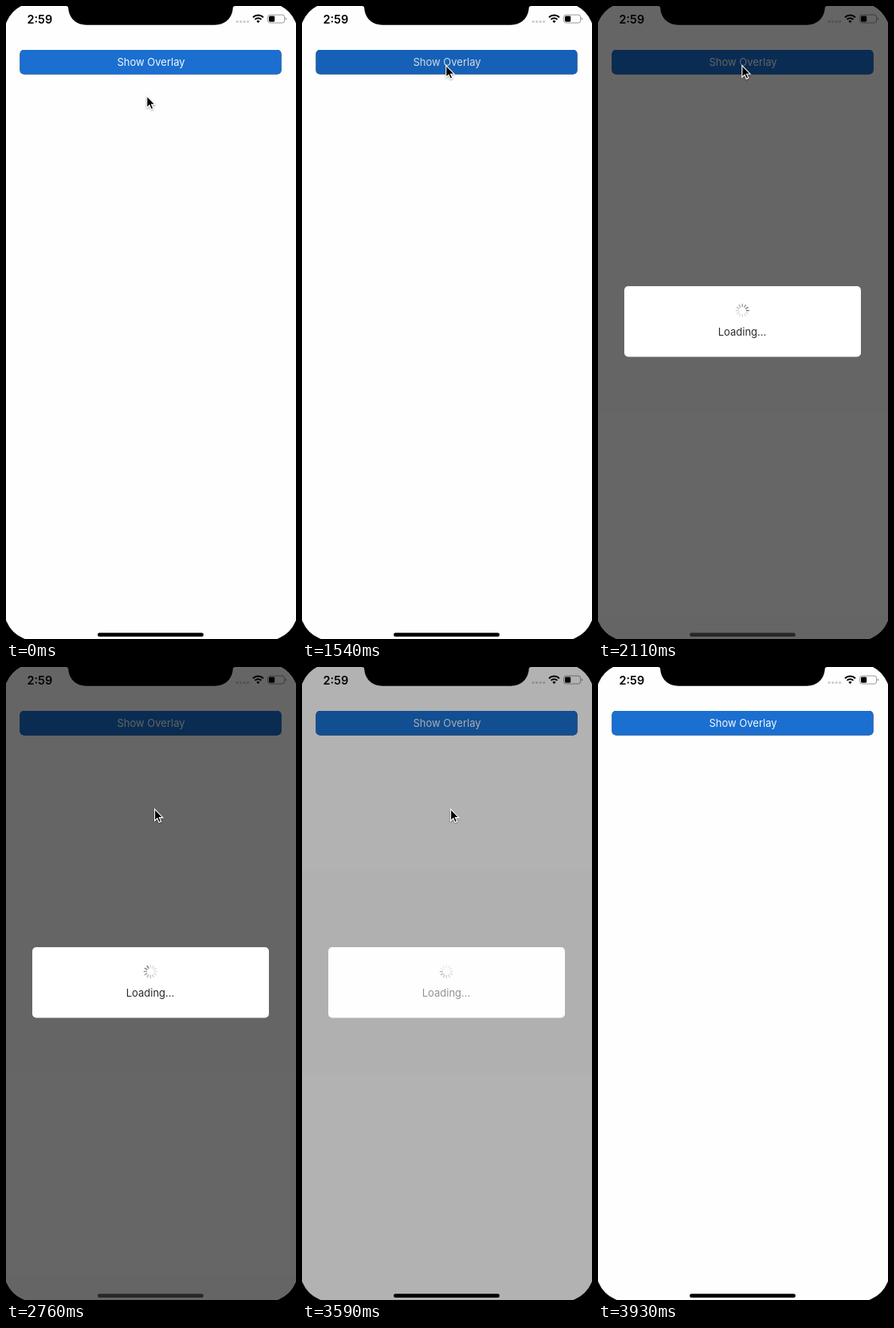
Write an HTML page that moves like this. It is 364 px wide and 793 px high and loops after 4.71 s.

```html
<!DOCTYPE html>
<html lang="en">
<head>
<meta charset="utf-8">
<title>Loading overlay</title>
<style>
  html, body { margin: 0; width: 100%; height: 100%; overflow: hidden; background: #000; }
  svg { display: block; width: 364px; height: 793px; }
  text { font-family: Inter, "Liberation Sans", sans-serif; font-size: 13px; text-anchor: middle; }
</style>
</head>
<body>
<svg viewBox="0 0 364 793" xmlns="http://www.w3.org/2000/svg">
  <defs>
    <clipPath id="screen"><rect x="-2" y="-4" width="368" height="799" rx="38"/></clipPath>
    <filter id="shadow" x="-50%" y="-50%" width="200%" height="200%">
      <feDropShadow dx="0" dy="1" stdDeviation="0.8" flood-opacity="0.4"/>
    </filter>
  </defs>
  <rect width="364" height="793"/>
  <g clip-path="url(#screen)">
    <rect width="364" height="793" fill="#fefefe"/>
    <rect x="17.5" y="55" width="328" height="30.5" rx="5"/>
    <g id="button">
      <rect x="17.5" y="55" width="328" height="30.5" rx="5" fill="#1a6fd1"/>
      <text x="182" y="75" fill="#f4f8fd">Show Overlay</text>
    </g>
    <g id="overlay">
      <rect width="364" height="793" fill-opacity="0.6"/>
      <rect x="33" y="351" width="297" height="88.5" rx="5" fill="#fff"/>
      <g id="spinner" transform="translate(181.3 381.5)" stroke="#6e6e6e" stroke-width="1.5" stroke-linecap="round"/>
      <text x="181" y="413" fill="#2a2a2a">Loading...</text>
    </g>
    <text x="42.3" y="21.6" style="font-size:14.5px;font-weight:600">2:59</text>
    <g fill-opacity="0.2">
      <circle cx="290.2" cy="19.6" r="1.6"/><circle cx="294.7" cy="19.6" r="1.6"/>
      <circle cx="299.2" cy="19.6" r="1.6"/><circle cx="303.7" cy="19.6" r="1.6"/>
    </g>
    <g fill="none" stroke="#000" stroke-width="2">
      <path d="M310 14.2a9.2 9.2 0 0 1 13 0"/>
      <path d="M312.5 16.9a5.7 5.7 0 0 1 8 0"/>
    </g>
    <path d="M316.5 21.2l-2.1-2.2a3 3 0 0 1 4.2 0z"/>
    <rect x="328.6" y="11.1" width="21" height="10" rx="2.8" fill="none" stroke="#000" stroke-opacity="0.4"/>
    <path d="M350.8 14.4q1.5 0.4 1.5 1.7t-1.5 1.7z" fill-opacity="0.4"/>
    <rect x="330" y="12.5" width="7.2" height="7.2" rx="1.4"/>
    <path d="M75 0Q78.3 0 78.3 3C79 15 88 23.7 101 23.7H262C275 23.7 284 15 284.7 3Q284.7 0 288 0Z"/>
    <rect id="home" x="115" y="785.3" width="133" height="4.7" rx="2.35"/>
  </g>
  <g id="cursor" filter="url(#shadow)">
    <path d="M0 0V14.6L3.3 11.5L5.5 16.6L8 15.5L5.8 10.6H10.3Z" stroke="#fff" stroke-width="1.1"/>
  </g>
</svg>
<script>
const LOOP = 4710, SPOKES = 12, TICK = 1000 / SPOKES;
const $ = id => document.getElementById(id);
const clamp = x => Math.min(1, Math.max(0, x));
const span = (t, a, b) => clamp((t - a) / (b - a));
const easeOut = x => 1 - (1 - x) ** 2;
const easeIn = x => x * x;
const easeInOut = x => x * x * (3 - 2 * x);

// cursor moves: start, end, x, y, easing
const start = [176.8, 112.8];
const moves = [
  [20, 350, 180.4, 86.4, easeInOut],
  [900, 1180, 180.8, 74.6, easeInOut],
  [2150, 2580, 186.6, 178, easeInOut],
  [3660, 3930, 366, -22, easeIn]
];

const spokes = Array.from({ length: SPOKES }, (_, i) => {
  const line = document.createElementNS("http://www.w3.org/2000/svg", "line");
  line.setAttribute("y1", -5);
  line.setAttribute("y2", -8);
  line.setAttribute("transform", `rotate(${i * 360 / SPOKES})`);
  $("spinner").append(line);
  return line;
});

function cursorAt(t) {
  let [x, y] = start;
  for (const [a, b, toX, toY, ease] of moves) {
    const k = ease(span(t, a, b));
    x += (toX - x) * k;
    y += (toY - y) * k;
  }
  return [x, y];
}

function draw(t) {
  const shown = easeOut(span(t, 1552, 1852)) - easeOut(span(t, 3504, 3804));
  $("overlay").setAttribute("opacity", shown);
  $("button").setAttribute("opacity", t >= 1535 && t < 1640 ? 0.88 : 1);

  const grey = Math.round(40 * clamp((shown - 0.6) / 0.4));
  $("home").setAttribute("fill", `rgb(${grey},${grey},${grey})`);

  const head = Math.floor((t - 2110) / TICK + 3.5);
  spokes.forEach((line, i) => {
    const age = (((head - i) % SPOKES) + SPOKES) % SPOKES;
    line.setAttribute("opacity", Math.max(0.22, 0.9 - age * 0.1));
  });

  $("cursor").setAttribute("transform", `translate(${cursorAt(t)})`);
  $("cursor").setAttribute("visibility", t < 3930 ? "visible" : "hidden");
}

function frame() {
  draw(performance.now() % LOOP);
  requestAnimationFrame(frame);
}
frame();
</script>
</body>
</html>
```
